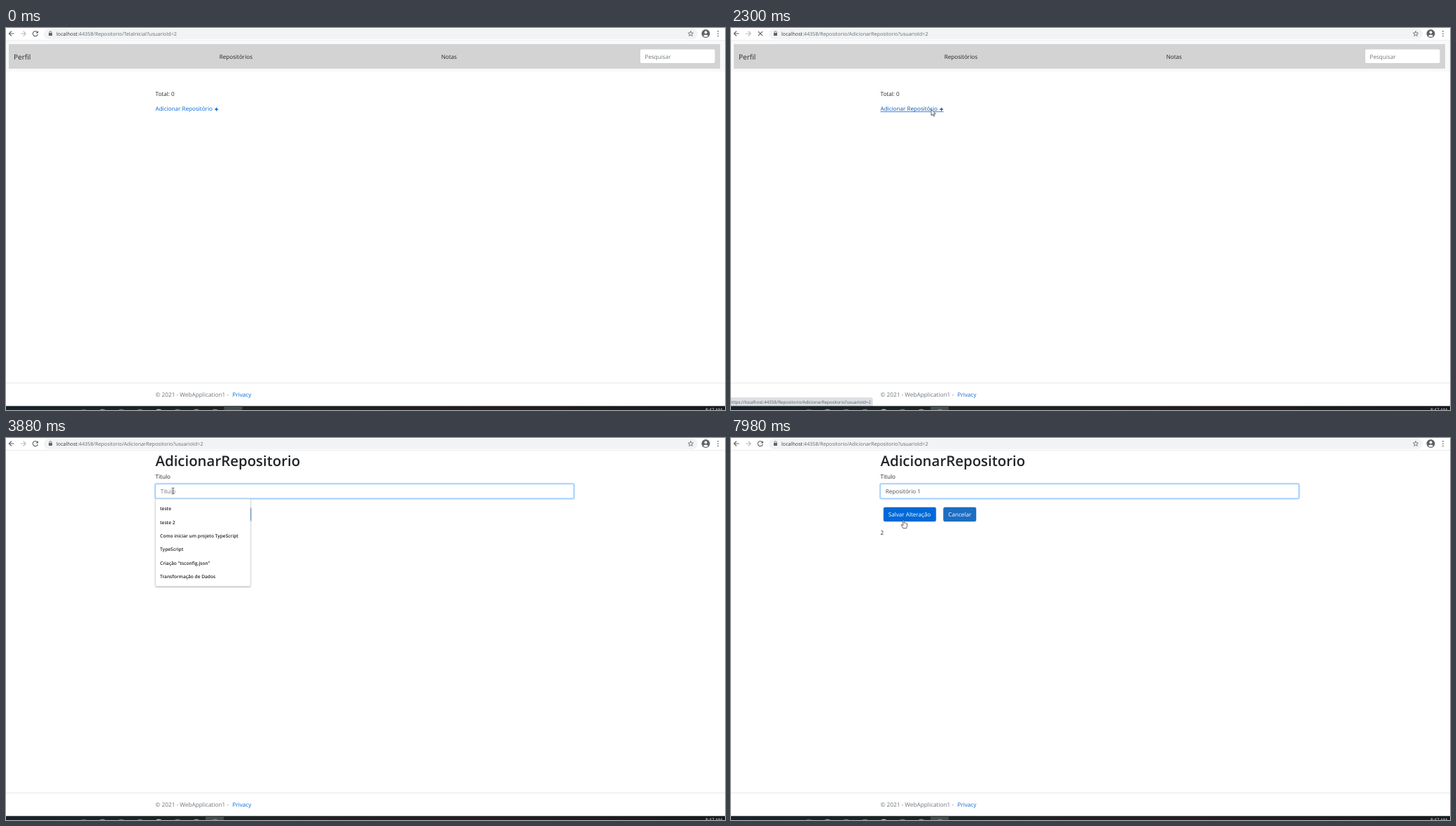
Write an HTML page that moves like this. It is 1027 by 545 pixels and loops after 8 s.

```html
<!DOCTYPE html>
<html lang="pt">
<head>
<meta charset="utf-8">
<title>Repositório</title>
<style>
  html, body { margin: 0; width: 100%; height: 100%; overflow: hidden; background: #fff; }
  svg { display: block; width: 1027px; height: 545px; }
  text { font: 8.15px "Open Sans", "Noto Sans", sans-serif; fill: #212529; white-space: pre; text-rendering: geometricPrecision; }
  .muted { fill: #6c757d; }
  .typed { fill: #495057; }
  .link { fill: #0366d6; }
  .hover .link { fill: #0056b3; }
  .url { font-size: 7.2px; fill: #686c70; }
  .options text { font-size: 6.6px; font-weight: 600; fill: #222; }
  .button { fill: #1b6ec2; stroke: #1861ac; stroke-width: .5; }
  .label { fill: #fff; }
  .icon { fill: none; stroke: #5f6368; stroke-width: 1.1; }
  .cursor { fill: #fff; stroke: #222; stroke-width: .7; stroke-linejoin: round; }
</style>
</head>
<body>
<svg viewBox="0 0 1027 545">
  <defs>
    <linearGradient id="bar">
      <stop offset="0" stop-color="#17222a"/>
      <stop offset=".35" stop-color="#1c2320"/>
      <stop offset=".65" stop-color="#211d20"/>
      <stop offset="1" stop-color="#141a1c"/>
    </linearGradient>
    <filter id="shadow" x="-5%" y="-5%" width="110%" height="112%">
      <feDropShadow dx="0" dy="1" stdDeviation="1" flood-opacity=".3"/>
    </filter>
  </defs>

  <!-- browser toolbar -->
  <rect x="54" y="1" width="934" height="15" rx="7.5" fill="#f1f3f4"/>
  <path d="M0 17.7H1027" stroke="#dfe1e4" stroke-width=".7"/>
  <path class="icon" d="M11.5 8H4.3M7.8 4.5L4.3 8L7.8 11.5"/>
  <path class="icon" d="M21 8H28.2M24.7 4.5L28.2 8L24.7 11.5" style="stroke:#babcbe"/>
  <g id="reload">
    <path class="icon" d="M44.9 6A3.6 3.6 0 1 0 45.4 9"/>
    <path d="M46 3.9V7.5H42.4Z" fill="#5f6368"/>
  </g>
  <path id="stop" class="icon" d="M38.8 4.8L45.2 11.2M45.2 4.8L38.8 11.2"/>
  <rect x="61" y="7" width="5" height="4" rx=".5" fill="#5f6368"/>
  <path class="icon" d="M62 7V6A1.5 1.5 0 0 1 65 6V7" style="stroke-width:.8"/>
  <text class="url" x="72" y="10.8"><tspan fill="#35383c">localhost</tspan><tspan id="path"></tspan></text>
  <path class="icon" style="stroke-width:.8" d="M978 4.4L979 7L981.7 7.1L979.6 8.8L980.3 11.4L978 9.9L975.7 11.4L976.4 8.8L974.3 7.1L977 7Z"/>
  <circle cx="999.5" cy="8" r="6" fill="#5f6368"/>
  <circle cx="999.5" cy="6.2" r="1.9" fill="#fff"/>
  <path d="M995.8 11.2Q999.5 7.6 1003.2 11.2Q999.5 14.2 995.8 11.2Z" fill="#fff"/>
  <path d="M1017 4.7h.01M1017 8h.01M1017 11.3h.01" stroke="#5f6368" stroke-width="1.7" stroke-linecap="round"/>

  <!-- repository list -->
  <g id="list">
    <rect y="18" width="1027" height="44" fill="#f8f9fa"/>
    <rect x="4" y="23" width="1016" height="35" fill="#d2d3d2"/>
    <text x="11" y="44.5" style="font-size:10px">Perfil</text>
    <text x="304.7" y="43.8">Repositórios</text>
    <text x="621.7" y="43.8">Notas</text>
    <rect x="906" y="30.5" width="106.5" height="19.5" rx="2" fill="#fff"/>
    <text class="muted" x="912.5" y="43.8">Pesquisar</text>
    <text x="213.5" y="96.8">Total: 0</text>
    <g id="add">
      <text class="link" x="213.5" y="118.2">Adicionar Repositório</text>
      <path d="M298.2 116H303M300.6 113.6V118.4" stroke="#0366d6" stroke-width="1.3"/>
      <path id="underline" d="M213.5 119.5H303.5" stroke="#0056b3" stroke-width=".7"/>
    </g>
  </g>

  <!-- new repository form -->
  <g id="form">
    <text x="213.5" y="39.6" style="font-size:20.4px;font-weight:600">AdicionarRepositorio</text>
    <text x="213.5" y="58">Titulo</text>
    <rect id="ring" x="212.6" y="64.9" width="599.2" height="22" rx="2.6" fill="none" stroke="#007bff" stroke-opacity=".28" stroke-width="1.8"/>
    <rect id="field" x="213.6" y="65.8" width="597.2" height="20.2" rx="2" fill="#fff" stroke-width=".7"/>
    <text id="value" x="220.7" y="79.4"></text>
    <path id="caret" d="M0 71V81.5" stroke="#333" stroke-width=".7"/>
    <rect id="save" class="button" x="218" y="99" width="74.7" height="20" rx="2"/>
    <text class="label" x="224.7" y="112.2">Salvar Alteração</text>
    <rect class="button" x="303.5" y="99" width="46.5" height="20" rx="2"/>
    <text class="label" x="310.3" y="112.2">Cancelar</text>
    <text x="213.5" y="137.6">2</text>
    <g id="options" class="options">
      <rect x="213.5" y="87" width="135.7" height="124.5" rx="1.5" fill="#fff" stroke="#c8c8c8" stroke-width=".5" filter="url(#shadow)"/>
    </g>
  </g>

  <!-- footer and taskbar -->
  <path d="M0 506.4H1027" stroke="#dee2e6" stroke-width=".8"/>
  <text class="muted" x="213.5" y="526.2" style="font-size:8.25px">© 2021 - WebApplication1 -</text>
  <text class="link" x="323.5" y="526.2">Privacy</text>
  <g id="status">
    <path d="M0 527.8H200Q202 527.8 202 530V539H0Z" fill="#dee1e6" stroke="#c4c7cb" stroke-width=".6"/>
    <text x="-1.5" y="535.9" style="font-size:6.2px;fill:#55595e">https://localhost:44358/Repositorio/AdicionarRepositorio?usuarioId=2</text>
  </g>
  <rect y="539.3" width="1027" height="6" fill="url(#bar)"/>
  <rect id="active" y="539.3" width="26" height="6" fill="#434a4b"/>
  <g id="tasks"></g>
  <text x="999" y="547.3" style="font-size:6.4px;fill:#eee">8:47 AM</text>

  <g id="pointer" class="cursor">
    <path id="arrow" d="M0 0V8.8L2 7L3.4 10L4.8 9.4L3.5 6.4H6.2Z"/>
    <path id="hand" d="M-.8 .8Q0 -.4 .8 .8V4.2Q1.6 3.5 2.3 4.5Q3.2 4 3.8 5Q4.9 4.5 5.1 5.7V8.4L4.2 11.8H-.6L-3.3 7.6Q-3.6 6.3 -2.2 6.6L-.8 8Z"/>
    <path id="beam" d="M-1.8 -4.3Q0 -4.3 0 -3.6Q0 -4.3 1.8 -4.3M0 -3.6V3.6M-1.8 4.3Q0 4.3 0 3.6Q0 4.3 1.8 4.3" fill="none"/>
  </g>
</svg>
<script>
const $ = id => document.getElementById(id);
const show = (id, on) => { $(id).style.display = on ? '' : 'none'; };
const clamp = v => Math.max(0, Math.min(1, v));

function add(parent, tag, attrs, text = '') {
  const el = document.createElementNS('http://www.w3.org/2000/svg', tag);
  for (const name in attrs) el.setAttribute(name, attrs[name]);
  el.textContent = text;
  $(parent).append(el);
}

['teste', 'teste 2', 'Como iniciar um projeto TypeScript', 'TypeScript', 'Criação "tsconfig.json"', 'Transformação de Dados']
  .forEach((s, i) => add('options', 'text', { x: 220, y: 103.2 + i * 19.35 }, s));

['#6d5518', '#a58d84', '#2583bd', '#a9642f', '#b9bcc5', '#527fae', '#8d91a0', '#b27a2a']
  .forEach((fill, i) => add('tasks', 'ellipse', { cx: 111 + i * 26.8, cy: 545.6, rx: 4, ry: 1.9, fill }));

// time, x, y of the pointer
const route = [
  [420, 1021, 540], [1020, 460, 240], [1180, 333, 170], [1300, 333, 170],
  [1800, 286, 116], [2610, 286, 116], [3150, 238.5, 75.5], [7700, 238.5, 75.5], [7980, 246.5, 117]
];
const title = 'Repositório 1';
const keyTimes = [4170, 4550, 4720, 4950, 5110, 5190, 5490, 6100, 6330, 6580, 6810, 6960, 7110];
const focusTime = 3350, formTime = 2460, blink = 530;

function pointerAt(t) {
  const i = route.findIndex(p => p[0] > t);
  if (i < 0) return route.at(-1).slice(1);
  if (i === 0) return route[0].slice(1);
  const [a, b] = [route[i - 1], route[i]];
  const k = (t - a[0]) / (b[0] - a[0]);
  return [a[1] + (b[1] - a[1]) * k, a[2] + (b[2] - a[2]) * k];
}

function drawPointer(t, x, y, onForm, onLink) {
  let shape = 'arrow';
  if (onForm) shape = y > 99 ? 'hand' : y > 87 ? 'arrow' : 'beam';
  else if (onLink && t < 2250) shape = 'hand';
  for (const id of ['arrow', 'hand', 'beam']) show(id, id === shape);
  show('pointer', t >= 420);
  $('pointer').setAttribute('transform', `translate(${x} ${y})`);
}

function drawField(t) {
  const count = keyTimes.filter(k => k <= t).length;
  const value = $('value');
  value.textContent = title.slice(0, count) || 'Titulo';
  value.setAttribute('class', count ? 'typed' : 'muted');
  const since = t - (count ? keyTimes[count - 1] : focusTime);
  show('caret', t >= focusTime && Math.floor(since / blink) % 2 === 0);
  const end = 220.7 + (count ? value.getComputedTextLength() : 0);
  $('caret').setAttribute('transform', `translate(${end} 0)`);
  $('ring').style.opacity = clamp((t - focusTime + 20) / 150);
  $('field').style.stroke = t < focusTime ? '#ced4da' : '#80bdff';
  show('options', t >= 3390 && !count);
}

function draw(t) {
  const [x, y] = pointerAt(t);
  const onForm = t >= formTime;
  const onLink = !onForm && t > 1200 && y < 120;
  const clicked = t >= 2200;

  show('list', !onForm);
  show('form', onForm);
  show('underline', onLink);
  $('add').setAttribute('class', onLink ? 'hover' : '');
  $('path').textContent = `:44358/Repositorio/${clicked ? 'AdicionarRepositorio' : 'TelaInicial'}?usuarioId=2`;
  show('stop', clicked && !onForm);
  show('reload', !clicked || onForm);
  $('active').setAttribute('x', clicked ? 285 : 311.5);
  $('status').style.opacity = t < 2050 ? 0 : 1 - clamp((t - 2780) / 150);
  $('save').style.fill = t > 2610 && y > 99 && y < 119 ? '#0069d9' : '';
  drawField(t);
  drawPointer(t, x, y, onForm, onLink);
}

function tick() {
  draw(performance.now() % 8000);
  requestAnimationFrame(tick);
}
tick();
</script>
</body>
</html>
```
